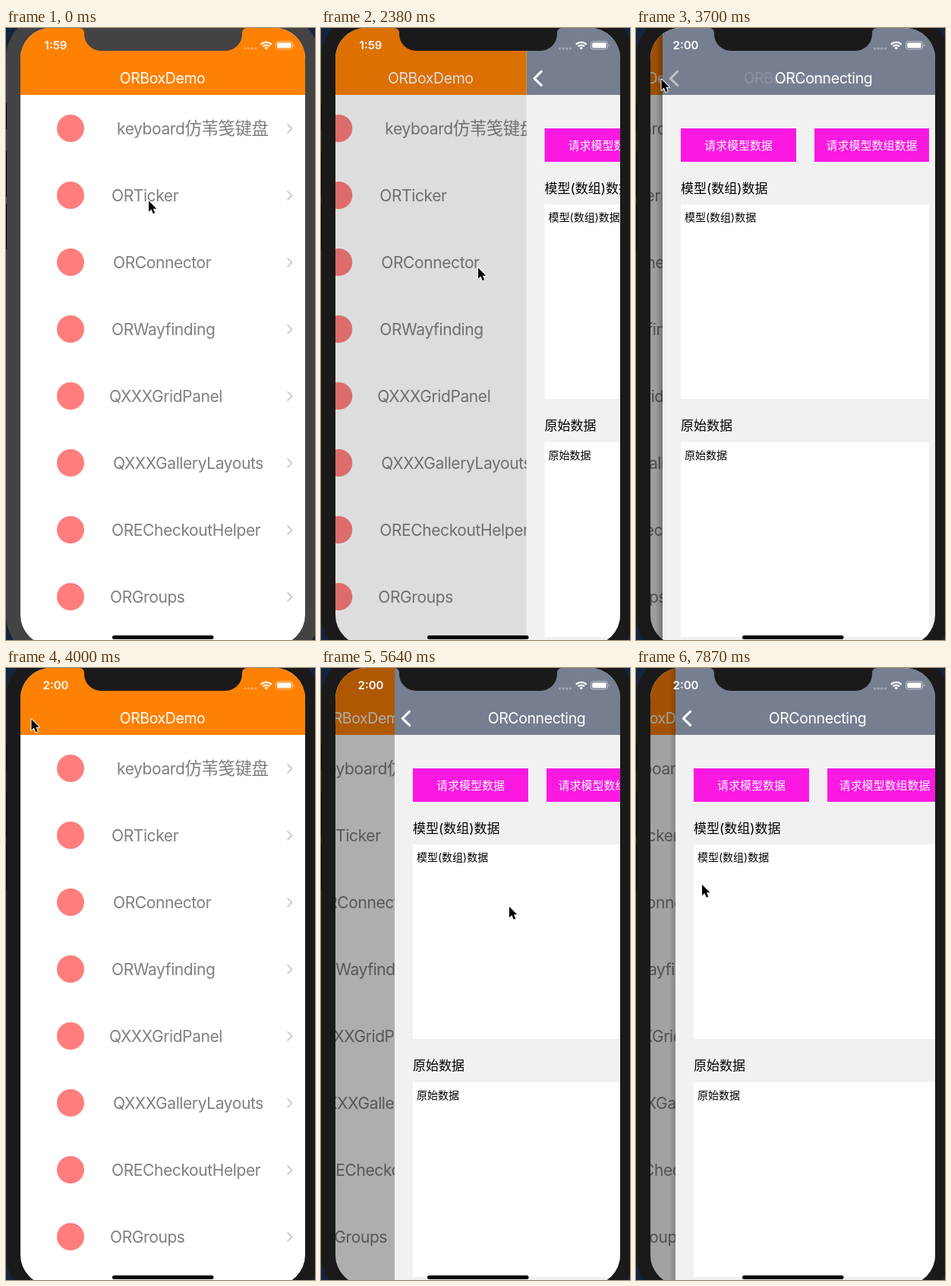
Recreate the animation shown at these times as an HTML page. Size 407 by 805 pixels, loop 8000 ms.

```html
<!DOCTYPE html>
<html lang="zh">
<head>
<meta charset="utf-8">
<style>
html, body { margin: 0; width: 100%; height: 100%; overflow: hidden; background: #14243f; }
svg { display: block; width: 407px; height: 805px; }
text { font-family: Inter, "Noto Sans CJK SC", "Noto Sans CJK", sans-serif; white-space: pre; }
.row { font-size: 21px; letter-spacing: -.4px; fill: #7f7f7f; }
.row .cjk { font-size: 22.4px; }
.title { font-size: 19.5px; letter-spacing: -.4px; fill: #fff; text-anchor: middle; }
.button { font-size: 15px; fill: #fff; text-anchor: middle; }
.label { font-size: 17px; }
.note { font-size: 14px; }
.time { font-size: 15px; font-weight: 600; fill: #fff; text-anchor: middle; }
.line { fill: none; stroke-linecap: round; stroke-linejoin: round; }
</style>
</head>
<body>
<svg viewBox="0 0 407 805">
  <defs>
    <clipPath id="screen"><rect x="19" width="375" height="812" rx="40"/></clipPath>
    <linearGradient id="fade">
      <stop offset="0" stop-opacity="0"/>
      <stop offset="1" stop-opacity=".35"/>
    </linearGradient>
  </defs>

  <rect class="body" y="-19" width="413" height="850" rx="59"/>
  <path d="M.5 99v34M.5 162v60M.5 231v60" stroke="#000"/>

  <g clip-path="url(#screen)">
    <g id="list">
      <rect x="19" width="375" height="805" fill="#fff"/>
      <rect x="19" width="375" height="88" fill="#ff8103"/>
      <text class="title" x="206" y="73">ORBoxDemo</text>
      <g id="rows"></g>
    </g>
    <rect id="dim" x="19" width="375" height="805"/>

    <g id="page">
      <rect id="shadow" x="10" width="9" height="805" fill="url(#fade)"/>
      <rect x="19" width="375" height="805" fill="#f1f1f1"/>
      <rect x="19" width="375" height="88" fill="#767f90"/>
      <path id="back" class="line" d="M38.7 57.2L29.3 66.3L38.7 75.4" stroke="#fff" stroke-width="3"/>
      <text id="ghost" class="title" x="182" y="73" opacity=".15">ORBoxDemo</text>
      <text id="heading" class="title" y="73">ORConnecting</text>
      <path d="M43 132h152v44h-152zM219 132h151v44h-151z" fill="#fb18e1"/>
      <text class="button" x="119" y="159.5">请求模型数据</text>
      <text class="button" x="294.5" y="159.5">请求模型数组数据</text>
      <path d="M43 232h327v256h-327zM43 545h327v256h-327z" fill="#fff"/>
      <text class="label" x="43" y="216.5">模型(数组)数据</text>
      <text class="note" x="48" y="254">模型(数组)数据</text>
      <text class="label" x="43" y="528.5">原始数据</text>
      <text class="note" x="48" y="566.5">原始数据</text>
    </g>

    <text id="clock" class="time" x="65.5" y="28.3"></text>
    <g fill="#fff">
      <g opacity=".3">
        <circle cx="314.5" cy="27" r="1.8"/><circle cx="319.2" cy="27" r="1.8"/>
        <circle cx="323.9" cy="27" r="1.8"/><circle cx="328.6" cy="27" r="1.8"/>
      </g>
      <g class="line" stroke="#fff" stroke-width="2.2" style="stroke-linecap:butt">
        <path d="M335.8 21.6a9.8 9.8 0 0 1 13.8 0M338.4 24.3a6.1 6.1 0 0 1 8.6 0"/>
      </g>
      <path d="M342.7 28.6l-2.3-2.5a3.3 3.3 0 0 1 4.6 0z"/>
      <rect x="355.5" y="17.5" width="22" height="10.5" rx="3" fill="none" stroke="#fff" stroke-opacity=".5"/>
      <rect x="357.2" y="19.2" width="18.6" height="7.1" rx="1.6"/>
      <path d="M379 21v3.6q1.3-.5 1.3-1.8t-1.3-1.8z" opacity=".5"/>
    </g>
    <rect x="140" y="799" width="133.5" height="5" rx="2.5"/>
  </g>
  <path class="body" d="M97 -1V0a6 6 0 0 1 6 6v2a22 22 0 0 0 22 22H289a22 22 0 0 0 22-22v-2a6 6 0 0 1 6-6v-1z"/>
  <path id="cursor" d="M0 0V14.2L3.3 11.1L5.8 16.8L8.3 15.7L5.9 10.2H10.3z"
    stroke="#fff" stroke-width="2" paint-order="stroke" stroke-linejoin="round"/>
</svg>

<script>
const TICK = 148, LOOP = 8000, WIDTH = 375;
const $ = id => document.getElementById(id);

const rows = [
  [146, 'keyboard<tspan class="cjk">仿苇笺键盘</tspan>'],
  [139, 'ORTicker'],
  [141, 'ORConnector'],
  [139, 'ORWayfinding'],
  [136, 'QXXXGridPanel'],
  [141, 'QXXXGalleryLayouts'],
  [139, 'ORECheckoutHelper'],
  [137, 'ORGroups']
];
$('rows').innerHTML = rows.map(([x, name], i) => `
  <g transform="translate(0 ${88 * i})">
    <circle cx="85" cy="132" r="18" fill="#ff7d7d"/>
    <text class="row" x="${x}" y="140">${name}</text>
    <path class="line" d="M371 126.8l5.5 5.5l-5.5 5.5" stroke="#c7c7cc" stroke-width="1.7"/>
  </g>`).join('');

// [tick, x, y]
const pointer = [
  [5, 188, 227.5], [10, 207, 315.5], [18, 207, 315.5], [23, 33.5, 67.5], [27, 33.5, 67.5],
  [30, 166, 314], [34, 166, 314], [38, 248, 314], [40, 310, 312], [42, 88, 304],
  [44, 22, 291], [46, 50, 283], [50, 50, 283], [53, 87, 285]
];
// [tick, distance of the detail page from its resting place]
const slide = [
  [15, WIDTH], [16, 251.6], [17, 0], [24, 0], [25, 16], [26, 230], [27, WIDTH],
  [30, WIDTH], [31, 251.6], [32, 0], [34, 0], [38, 78], [39, 130], [40, 300], [41, WIDTH],
  [47, WIDTH], [48, 251.6], [49, 40], [50, 0], [53, 33]
];

function at(keys, k, axis = 1) {
  const i = keys.findIndex(key => key[0] >= k);
  if (i < 0) return keys[keys.length - 1][axis];
  if (i === 0) return keys[0][axis];
  const a = keys[i - 1], b = keys[i];
  return a[axis] + (b[axis] - a[axis]) * (k - a[0]) / (b[0] - a[0]);
}

const move = (id, x, y = 0) => $(id).setAttribute('transform', `translate(${x} ${y})`);
const set = (id, name, value) => $(id).setAttribute(name, value);

function draw(ms) {
  const k = Math.min(53, Math.floor(ms / TICK));
  const off = at(slide, k), cover = 1 - off / WIDTH;
  const popping = k === 25 || k === 26;

  move('list', -cover * (popping ? 204 : WIDTH / 2));
  move('page', off);
  move('cursor', at(pointer, k), at(pointer, k, 2));
  set('dim', 'opacity', .4 * cover);
  set('shadow', 'opacity', Math.max(0, 1 - off / 60));
  set('back', 'opacity', popping ? .5 : 1);
  set('heading', 'x', popping ? 231 : 206);
  set('ghost', 'visibility', popping ? 'visible' : 'hidden');
  $('clock').textContent = k < 22 ? '1:59' : '2:00';
  for (const part of document.querySelectorAll('.body'))
    part.setAttribute('fill', k < 13 ? '#434343' : '#1a1a1a');
}

const start = performance.now();
function loop(now) {
  draw(Math.max(0, now - start) % LOOP);
  requestAnimationFrame(loop);
}
draw(0);
requestAnimationFrame(loop);
</script>
</body>
</html>
```
